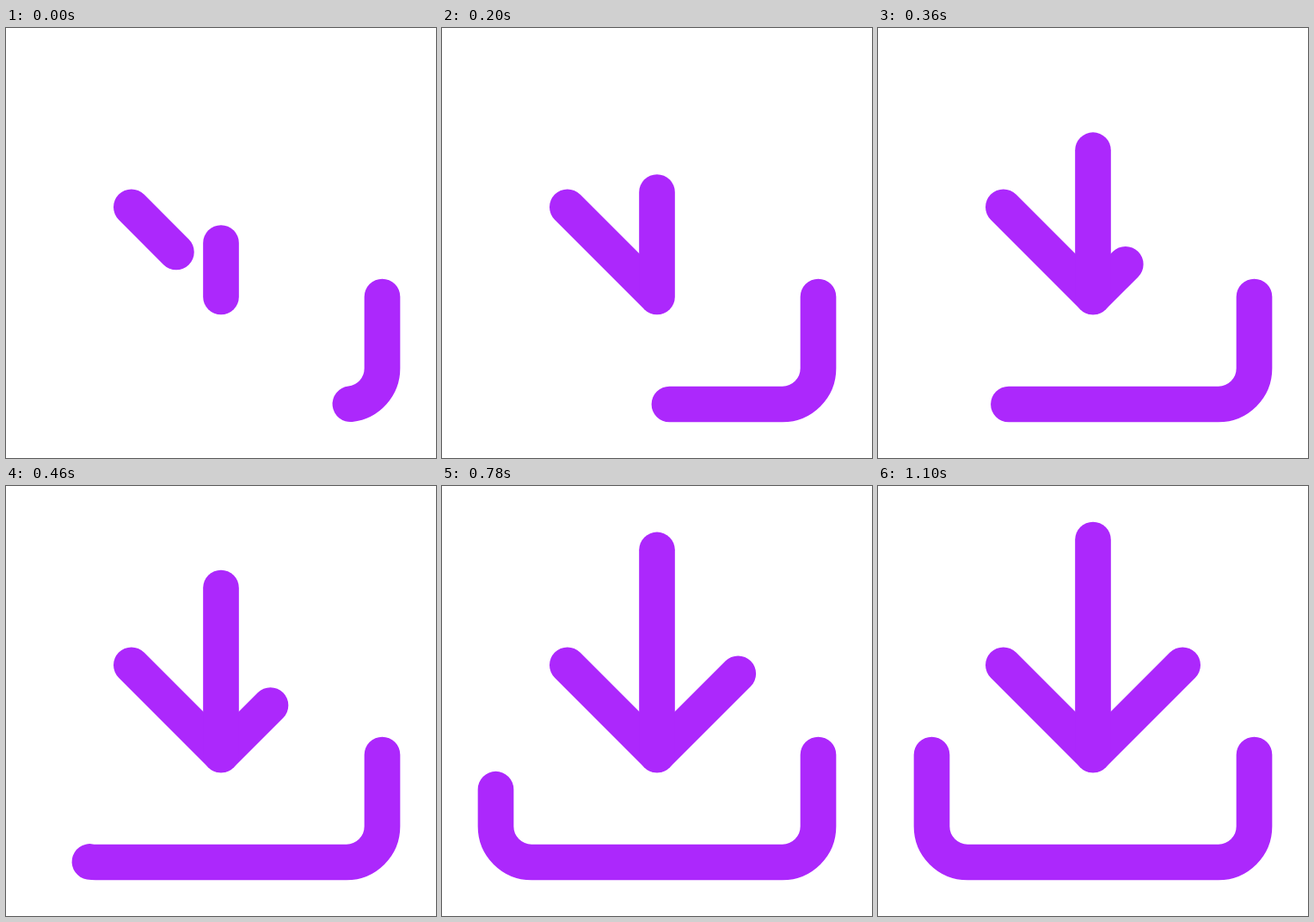
Write an HTML page that moves like this. It is 500x500 px and loops after 1.22 s.

```html
<!DOCTYPE html>
<html lang="en">
<head>
<meta charset="utf-8">
<title>Download icon</title>
<style>
  html, body { margin: 0; height: 100%; overflow: hidden; background: #fff; }
  svg {
    display: block; width: 100%; height: 100%;
    fill: none; stroke: #ac28fc; stroke-width: 2;
    stroke-linecap: round; stroke-linejoin: round;
  }
</style>
</head>
<body>
<svg viewBox="0 0 24 24">
  <path pathLength="1" d="M21 15v4a2 2 0 0 1-2 2H5a2 2 0 0 1-2-2v-4"/>
  <path pathLength="1" d="M7 10l5 5 5-5"/>
  <path pathLength="1" d="M12 15V3"/>
</svg>
<script>
const LOOP = 1220, STEP = 20;
const paths = document.querySelectorAll('path');

// Drawn share of every stroke: [time in ms, share]
const keys = [[0, .25], [120, .38], [280, .592], [460, .776],
              [620, .884], [780, .9525], [1100, 1]];
const rate = i => (keys[i + 1][1] - keys[i][1]) / (keys[i + 1][0] - keys[i][0]);
const slopes = keys.map(([t], i) => {
  if (i === 0) return .00085;
  if (i === keys.length - 1) return 0;
  const before = t - keys[i - 1][0], after = keys[i + 1][0] - t;
  return (after * rate(i - 1) + before * rate(i)) / (before + after);
});

// Smooth cubic curve through the keys
function share(t) {
  const i = keys.findIndex(k => k[0] > t) - 1;
  if (i < 0) return 1;
  const [t0, a] = keys[i], [t1, b] = keys[i + 1];
  const h = t1 - t0, u = (t - t0) / h, v = 1 - u;
  return a * v * v * (1 + 2 * u) + b * u * u * (1 + 2 * v)
       + h * u * v * (slopes[i] * v - slopes[i + 1] * u);
}

let start;
function draw(now) {
  start ??= now;
  const t = (now - start) % LOOP;
  const p = share(t - t % STEP);
  paths.forEach(el => el.setAttribute('stroke-dasharray', p < 1 ? `${p} 2` : 'none'));
  requestAnimationFrame(draw);
}
draw(performance.now());
</script>
</body>
</html>
```
